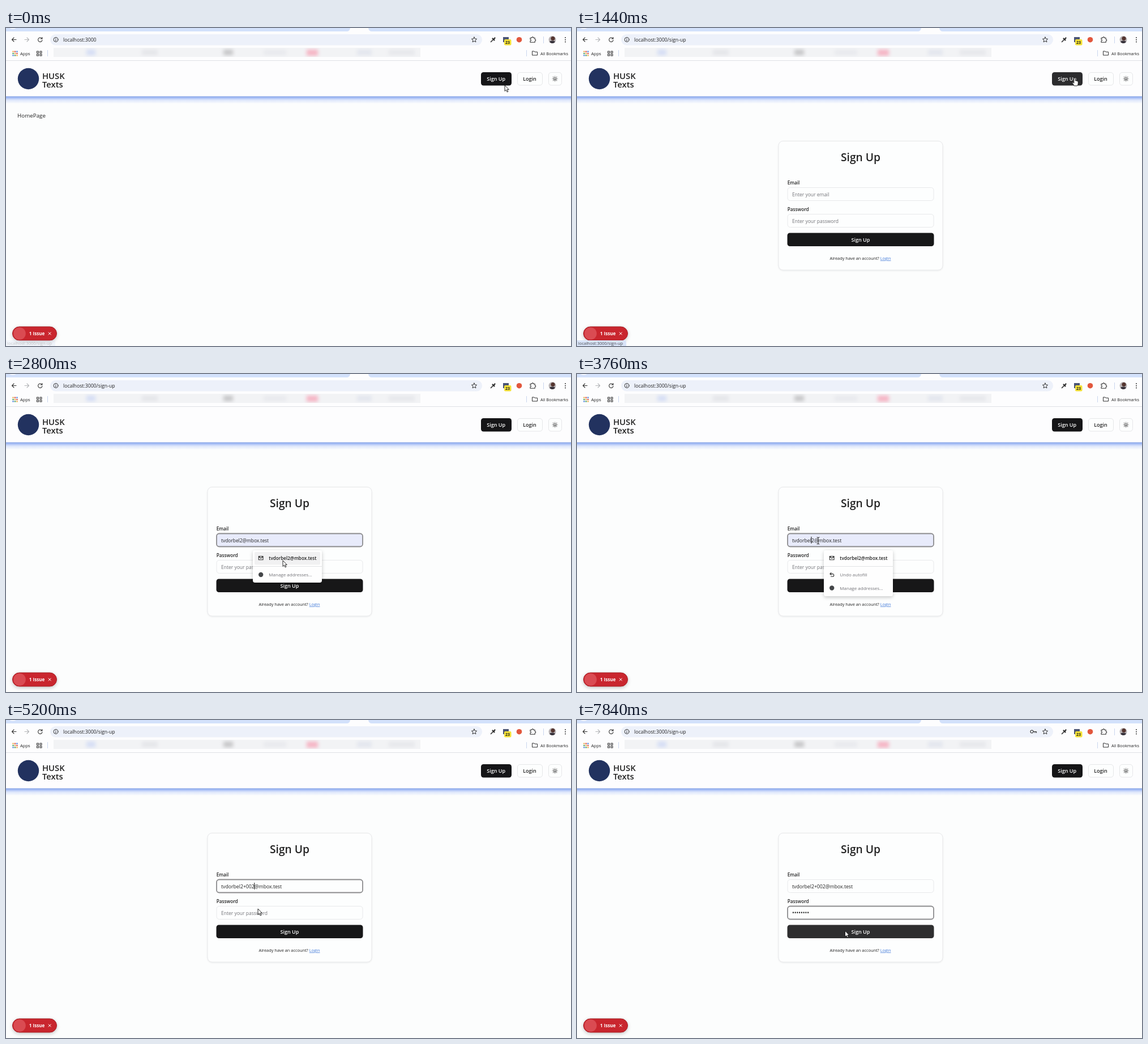
Animation, 998 px wide and 561 px high, one loop 8000 ms. Source, as an HTML page:

```html
<!DOCTYPE html>
<html lang="en">
<head>
<meta charset="utf-8">
<title>Sign up</title>
<style>
  html, body { margin: 0; width: 100%; height: 100%; overflow: hidden; background: #fcfdfd; }
  svg { display: block; width: 100vw; height: 100vh; }
  text { font-family: "Open Sans", "Noto Sans", sans-serif; font-size: 8.5px; fill: #222; white-space: pre; }
  .bold { font-weight: 600; }
  .hint { fill: #737378; }
  .on-dark { fill: #fff; font-size: 9px; font-weight: 600; }
  .line { fill: none; stroke: #333; stroke-width: 1.1; stroke-linecap: round; stroke-linejoin: round; }
  .box { fill: #fdfefe; stroke: #e6e7e9; stroke-width: 1; }
  .field { fill: #fdfefe; stroke: #e8e9eb; stroke-width: 1; }
  .field.focus { stroke: #8c8c8e; stroke-width: 1.8; }
  .field.filled { fill: #e8ebfb; }
</style>
</head>
<body>
<svg viewBox="0 0 998 561" preserveAspectRatio="none">
  <defs>
    <linearGradient id="glow" x1="0" y1="0" x2="0" y2="1">
      <stop offset="0" stop-color="#86a3e6"/>
      <stop offset=".22" stop-color="#a9c0f6"/>
      <stop offset=".5" stop-color="#dde6fb"/>
      <stop offset="1" stop-color="#fcfdfd"/>
    </linearGradient>
    <filter id="blur" x="-10%" y="-80%" width="120%" height="260%"><feGaussianBlur stdDeviation="3"/></filter>
    <filter id="soft" x="-20%" y="-30%" width="140%" height="170%">
      <feDropShadow dx="0" dy="2" stdDeviation="3" flood-color="#000" flood-opacity=".22"/>
    </filter>
    <filter id="faint" x="-5%" y="-5%" width="110%" height="112%">
      <feDropShadow dx="0" dy="1" stdDeviation="1" flood-color="#000" flood-opacity=".08"/>
    </filter>
    <clipPath id="face"><circle cx="965" cy="20.5" r="6.5"/></clipPath>
    <clipPath id="marks"><rect x="84" y="35" width="648" height="16"/></clipPath>
  </defs>

  <!-- Browser bar -->
  <rect width="998" height="561" fill="#fcfdfd"/>
  <rect width="998" height="58" fill="#fdfdfe"/>
  <rect width="998" height="6" fill="#d3e1fb"/>
  <path d="M602 6Q607 6 608 0H640Q641 6 646 6Z" fill="#fdfdfe"/>
  <path d="M6 0Q12 3 18 0Z" fill="#fdfdfe"/>
  <rect x="78" y="11" width="763" height="19.5" rx="9.7" fill="#edf1fa"/>
  <g class="line">
    <path d="M18 20.5H10.5M14 17L10.5 20.5L14 24"/>
    <path d="M33 20.5H40.5M37 17L40.5 20.5L37 24" stroke="#b3b5b8"/>
    <path d="M63 18.2A3.7 3.7 0 1 0 64 21.2M64 16.5V19H61.3"/>
    <circle cx="88" cy="20.5" r="3.9" stroke-width="1"/>
    <path d="M88 20.2V22.4M88 18.4V18.5"/>
    <path d="M827 16L828.4 19 831.6 19.3 829.2 21.5 829.9 24.8 827 23.1 824.1 24.8 824.8 21.5 822.4 19.3 825.6 19Z" stroke-width="1"/>
    <path d="M856.5 24.5L861 20" stroke-width="1.6"/>
    <path d="M859.5 18.5L862.5 21.5M862 19.5L863.5 17.5" stroke-width="2.2"/>
    <path d="M926 17.5H928.6A1.6 1.6 0 0 1 931.8 17.5H934.2V20A1.5 1.5 0 0 1 934.2 23V25.3H926V22.8A1.4 1.4 0 0 0 926 20Z"/>
    <path d="M929.5 42V48H938.5V42.2H934L933 41H929.5Z" stroke-width="1"/>
  </g>
  <rect x="878" y="16" width="10" height="9" fill="#4b5575"/>
  <rect x="880" y="20" width="12.5" height="10.5" rx="2" fill="#f5e236"/>
  <text x="882" y="28" font-weight="700" style="font-size:7px">23</text>
  <circle cx="906.5" cy="20.7" r="4.8" fill="#e2573d"/>
  <path d="M949.5 15V27" stroke="#c9d6ee"/>
  <g clip-path="url(#face)">
    <rect x="958" y="13" width="14" height="15" fill="#b9b4b6"/>
    <circle cx="966" cy="18.5" r="3.6" fill="#54352f"/>
    <ellipse cx="965" cy="27.5" rx="6.5" ry="5" fill="#353039"/>
  </g>
  <g fill="#333"><circle cx="988" cy="17" r="1"/><circle cx="988" cy="20.7" r="1"/><circle cx="988" cy="24.4" r="1"/></g>
  <g id="apps"></g>
  <g class="line" stroke-width="1"><path d="M54.5 41H57.5V44H54.5ZM60 41H63V44H60ZM54.5 46H57.5V49H54.5ZM60 46H63V49H60Z"/></g>
  <path d="M73.5 39V50M919.5 39V50" stroke="#c9d6ee"/>
  <text x="25" y="47.6" style="font-size:7.6px">Apps</text>
  <text x="944" y="47.6" style="font-size:7.35px">All Bookmarks</text>
  <g clip-path="url(#marks)">
    <rect x="84" y="35" width="648" height="16" fill="#f2f3f5"/>
    <g filter="url(#blur)">
      <rect x="142" y="38" width="16" height="10" fill="#d5def5"/>
      <rect x="240" y="38" width="28" height="10" fill="#e5e6ea"/>
      <rect x="384" y="38" width="17" height="10" fill="#c7c7c9"/>
      <rect x="455" y="38" width="40" height="10" fill="#e9eaee"/>
      <rect x="531" y="38" width="20" height="11" fill="#f6b5c5"/>
      <rect x="620" y="38" width="26" height="10" fill="#e3e6ee"/>
      <rect x="676" y="38" width="46" height="10" fill="#e7e8ec"/>
    </g>
  </g>
  <text id="url" x="101" y="23.7" style="font-size:8.7px"></text>
  <g id="key" class="line"><circle cx="803.5" cy="20.5" r="2.5"/><path d="M806 20.5H811.5V22.5M809 20.5V22.5"/></g>

  <!-- Site header -->
  <path d="M0 57.5H998" stroke="#dfe1e5"/>
  <rect y="58" width="998" height="63" fill="#fdfdfe"/>
  <rect y="120.5" width="998" height="13" fill="url(#glow)"/>
  <circle cx="39.5" cy="89.5" r="18.7" fill="#22325f"/>
  <g class="bold"><text x="64" y="89.7" style="font-size:14.8px">HUSK</text><text x="64" y="105.3" style="font-size:14.8px">Texts</text></g>
  <rect id="signUp" x="839" y="78" width="54" height="23.5" rx="4.5"/>
  <text class="on-dark" x="849.3" y="93">Sign Up</text>
  <rect class="box" x="903.5" y="78.5" width="44" height="22.5" rx="4.5"/>
  <text class="bold" x="913.2" y="93" style="font-size:9px">Login</text>
  <rect class="box" x="958.5" y="78.5" width="23" height="22.5" rx="4.5"/>
  <g class="line"><circle cx="969.7" cy="89.7" r="2"/><circle cx="969.7" cy="89.7" r="4.2" stroke-width="1.3" stroke-linecap="butt" pathLength="16" stroke-dasharray=".6 1.4" stroke-dashoffset=".3"/></g>

  <text id="home" x="20" y="158.3" style="font-size:9.8px">HomePage</text>

  <!-- Form -->
  <g id="form">
    <rect class="box" x="356" y="199.5" width="290" height="227.5" rx="8" filter="url(#faint)"/>
    <text class="bold" x="466" y="234.7" style="font-size:19.2px">Sign Up</text>
    <text class="bold" x="371.7" y="275.7" style="font-size:8.2px">Email</text>
    <rect id="mailBox" x="372" y="281.5" width="258" height="23" rx="4.5"/>
    <text id="mailHint" class="hint" x="380" y="297">Enter your email</text>
    <text id="mail" x="380" y="297"></text>
    <text class="bold" x="371.7" y="322.7" style="font-size:8.2px">Password</text>
    <rect id="passBox" x="372" y="328.5" width="258" height="23" rx="4.5"/>
    <text id="passHint" class="hint" x="380" y="343.6">Enter your password</text>
    <text id="pass" x="380" y="344" style="font-size:10px"></text>
    <rect id="caret" width="1" height="12" fill="#111"/>
    <rect id="submit" x="371.5" y="361.5" width="259" height="23.5" rx="4.5"/>
    <text class="on-dark" x="484.5" y="376.7">Sign Up</text>
    <text x="446.5" y="409" style="font-size:7.4px">Already have an account? <tspan fill="#3f78d8" text-decoration="underline">Login</tspan></text>
  </g>

  <!-- Suggestion list -->
  <g id="popup">
    <rect id="popupBox" x="436" y="311" width="122" rx="4" fill="#fefefe" filter="url(#soft)"/>
    <rect id="item" x="439" y="314" width="116" height="22.5" rx="2" fill="#f1f1f2"/>
    <path d="M436 339.5H558" stroke="#e2e3e5"/>
    <g class="line" stroke-width="1"><path d="M446.3 321.5H454V327.8H446.3ZM446.5 322L450.2 325 453.8 322"/></g>
    <text class="bold" x="464.3" y="328" style="font-size:8.1px">tvdorbel2@mbox.test</text>
    <g id="undo">
      <path class="line" d="M449 350.5L446.8 352.6 449 354.7M447 352.6H451.5A2.2 2.2 0 0 1 451.5 357.2H448.5"/>
      <text class="hint" x="464.3" y="357" style="font-size:8px">Undo autofill</text>
    </g>
    <g id="manage">
      <circle cx="450.2" cy="354" r="4.2" fill="#444649"/>
      <text class="hint" x="464.3" y="357" style="font-size:8px">Manage addresses...</text>
    </g>
  </g>

  <!-- Corner badge and link preview -->
  <g filter="url(#soft)"><rect x="11.5" y="527" width="78" height="24" rx="12" fill="#c9282f" stroke="#a51f27"/></g>
  <circle cx="24" cy="539" r="10.8" fill="#da4b52"/>
  <text x="40.8" y="542" fill="#fff" font-weight="700" style="font-size:8.1px;fill:#fff">1 Issue</text>
  <path d="M74.8 536.6L79.6 541.4M79.6 536.6L74.8 541.4" stroke="#fff"/>
  <g id="status">
    <path d="M0 551H84Q87 551 87 554V561H0Z" fill="#d9e4f8"/>
    <text x="2" y="559" style="font-size:7.5px;fill:#484b50">localhost:3000/sign-up</text>
  </g>

  <g id="pointer">
    <path id="arrow" d="M0 0V10.4L2.4 8.2 4.2 12 5.9 11.2 4.2 7.6H7.3Z" fill="#fff" stroke="#111" stroke-width=".9" stroke-linejoin="round"/>
    <path id="hand" d="M-1.2 6V0Q0-1.8 1.2 0V4Q2.2 3.2 3 4.3 4 3.7 4.7 4.8 6.2 4.4 6.2 6V9Q6 11.5 4.7 13H-.8Q-2 10.5-4 8.2-4 6.2-2.4 7L-1.2 8.2Z" fill="#fff" stroke="#111" stroke-width=".9" stroke-linejoin="round"/>
    <path id="beam" class="line" d="M-2-6Q0-6 0-5 0-6 2-6M0-5V5M-2 6Q0 6 0 5 0 6 2 6"/>
  </g>
</svg>
<script>
const LOOP = 8000, TICK = 80;
const USER = 'tvdorbel2', HOST = '@mbox.test', ADDRESS = USER + HOST;
const $ = Object.fromEntries([...document.querySelectorAll('[id]')].map(el => [el.id, el]));

// Each entry changes part of the state from its time on.
const steps = [
  [0, { page: 'home', status: .3, cursor: 'arrow', focus: '', mail: '', size: 8.7, popup: 0, dots: 0 }],
  [80, { status: .1 }],
  [160, { status: 0 }],
  [560, { hover: true, cursor: 'hand' }],
  [800, { status: .5 }],
  [880, { status: 1 }],
  [1440, { page: 'form' }],
  [1760, { hover: false, cursor: 'arrow' }],
  [2000, { status: .6 }],
  [2080, { status: .3 }],
  [2160, { status: 0, cursor: 'beam', focus: 'mail', caret: 0 }],
  [2240, { popup: 1 }],
  [2560, { caret: -1 }],
  [2720, { cursor: 'arrow' }],
  [2800, { mail: ADDRESS, filled: true, size: 8.4, item: true }],
  [3040, { size: 8.7, popup: 0, item: false, caret: ADDRESS.length }],
  [3280, { cursor: 'beam' }],
  [3520, { caret: -1 }],
  [3600, { caret: 8 }],
  [3680, { popup: 2 }],
  [3920, { caret: 9 }],
  [4160, { cursor: 'arrow' }],
  [4240, { item: true, size: 8.4, caret: -1 }],
  [4800, { popup: 0, item: false, filled: false, size: 8.7, mail: USER + '+' + HOST, caret: 10 }],
  [4960, { mail: USER + '+0' + HOST, caret: 11 }],
  [5040, { mail: USER + '+00' + HOST, caret: 12 }],
  [5200, { mail: USER + '+002' + HOST, caret: 13 }],
  [5440, { caret: -1 }],
  [5680, { cursor: 'beam' }],
  [5760, { focus: 'pass', caret: 0 }],
  [6160, { caret: -1 }],
  [6400, { caret: 0 }],
  ...[6640, 6720, 6800, 6880, 7120, 7280, 7440, 7520].map((t, i) => [t, { dots: i + 1, caret: i + 1 }]),
  [7680, { cursor: 'arrow', caret: -1 }],
  [7760, { press: true }]
];

// Pointer path: time, x, y
const path = [
  [0, 881, 101], [320, 881, 101], [1120, 879, 89], [1680, 879, 89], [2160, 490, 294],
  [2640, 490, 294], [2800, 489, 329], [3040, 489, 329], [3520, 426, 294],
  [4000, 426, 294], [4240, 445, 333], [5520, 445, 333], [5760, 444, 339],
  [7520, 444, 339], [7840, 473.5, 372]
];

function pointerAt(t) {
  const i = path.findIndex(p => p[0] > t);
  if (i < 0) return path[path.length - 1].slice(1);
  const [t0, x0, y0] = path[i - 1], [t1, x1, y1] = path[i];
  const k = (t - t0) / (t1 - t0), e = k * k * (3 - 2 * k);
  return [x0 + (x1 - x0) * e, y0 + (y1 - y0) * e];
}

const show = (el, on) => el.style.display = on ? '' : 'none';
const put = (el, text) => { if (el.textContent !== text) el.textContent = text; };

function drawCaret(s) {
  const el = s.focus === 'pass' ? $.pass : $.mail;
  show($.caret, s.focus && s.caret >= 0);
  if (!s.focus || s.caret < 0) return;
  const x = 380 + (s.caret ? el.getSubStringLength(0, s.caret) : 0);
  $.caret.setAttribute('x', x - .5);
  $.caret.setAttribute('y', s.focus === 'pass' ? 334 : 287);
}

function render(t) {
  const s = Object.assign({}, ...steps.filter(step => step[0] <= t).map(step => step[1]));
  const form = s.page === 'form';
  show($.home, !form);
  show($.form, form);
  put($.url, 'localhost:3000' + (form ? '/sign-up' : ''));
  show($.key, s.dots);
  $.status.style.opacity = s.status;
  $.signUp.style.fill = s.hover ? '#2c2c2e' : '#151517';
  $.submit.style.fill = s.press ? '#2e2e2f' : '#171718';

  for (const name of ['mail', 'pass']) {
    $[name + 'Box'].setAttribute('class', 'field' + (s.focus === name ? ' focus' : '') +
      (name === 'mail' && s.filled ? ' filled' : ''));
  }
  $.mail.style.fontSize = s.size + 'px';
  put($.mail, s.mail);
  put($.pass, '•'.repeat(s.dots));
  show($.mailHint, !s.mail);
  show($.passHint, !s.dots);
  drawCaret(s);

  show($.popup, s.popup);
  show($.item, s.item);
  show($.undo, s.popup === 2);
  $.popupBox.setAttribute('height', s.popup === 2 ? 81 : 57);
  $.manage.setAttribute('transform', `translate(0 ${s.popup === 2 ? 23.5 : 0})`);

  for (const kind of ['arrow', 'hand', 'beam']) show($[kind], s.cursor === kind);
  $.pointer.setAttribute('transform', `translate(${pointerAt(t)})`);
}

const colors = ['#d9453b', '#e8a33a', '#3e9b5b', '#3f78d8'];
for (let i = 0; i < 9; i++) {
  const dot = document.createElementNS('http://www.w3.org/2000/svg', 'rect');
  const size = { x: 11.5 + i % 3 * 3.4, y: 40.5 + Math.floor(i / 3) * 3.4, width: 2.2, height: 2.2, fill: colors[(i * 3 + 1) % 4] };
  for (const key in size) dot.setAttribute(key, size[key]);
  $.apps.append(dot);
}

const start = performance.now();
let last = -1;
function frame() {
  const t = Math.floor((performance.now() - start) % LOOP / TICK) * TICK;
  if (t !== last) render(last = t);
  requestAnimationFrame(frame);
}
frame();
</script>
</body>
</html>
```
